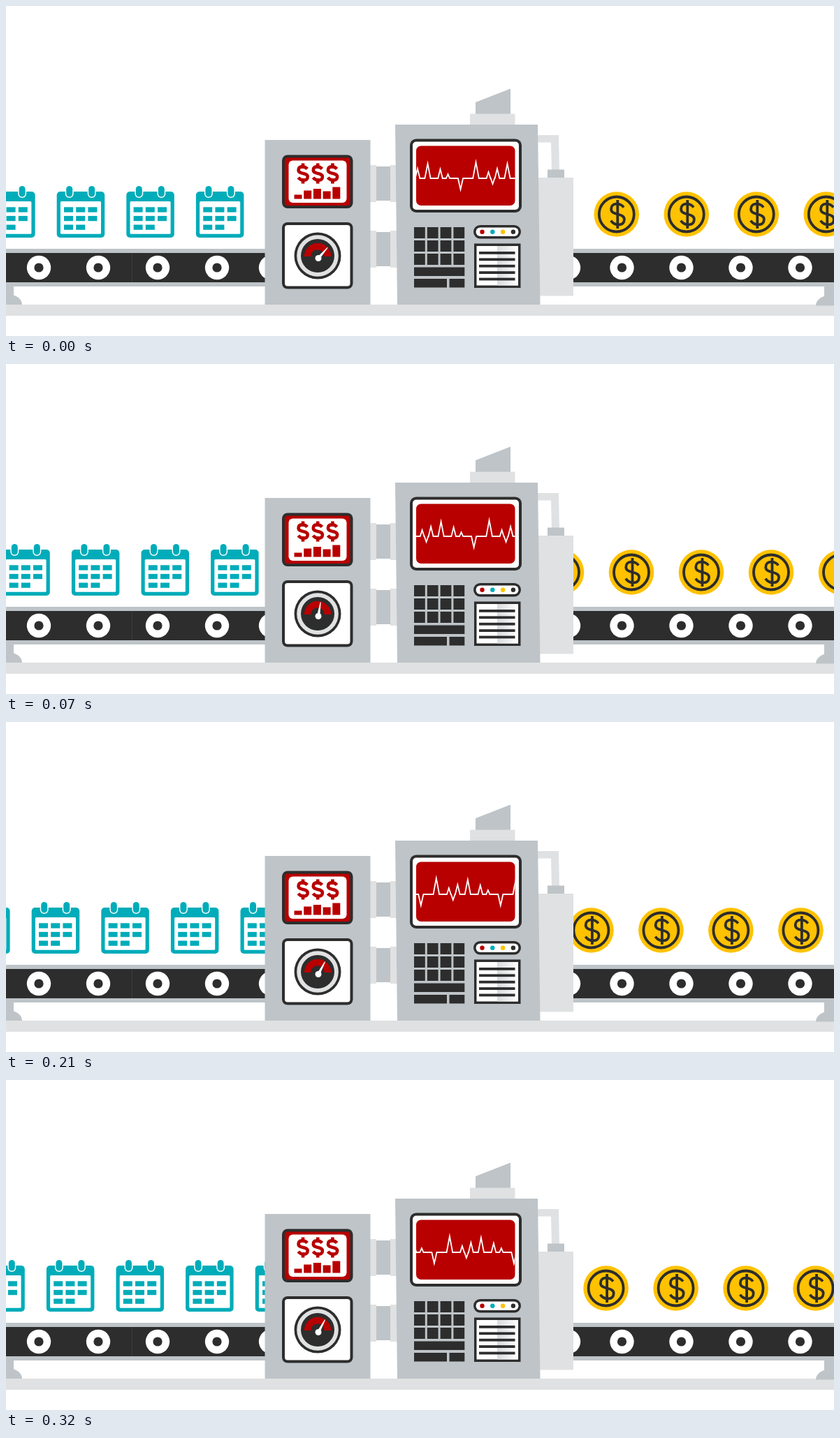
Write an HTML page with a canvas that moves like this. It is 1185 px wide and 473 px high and loops after 0.35 s.

```html
<!DOCTYPE html>
<html lang="en">
<head>
<meta charset="utf-8">
<title>Conveyor machine</title>
<style>
html, body { margin: 0; width: 100%; height: 100%; overflow: hidden; background: #fff; }
canvas { display: block; }
</style>
</head>
<body>
<canvas id="stage" width="1185" height="473"></canvas>
<script>
const ctx = document.getElementById('stage').getContext('2d');
const W = 1185, H = 473, STEP = 70, STEPS = 5;
const GRAY = '#bec4c8', LIGHT = '#e0e1e2', DARK = '#2d2d2d', WHITE = '#fff';
const RED = '#b80000', TEAL = '#00acb9', GOLD = '#ffc200';

// Boxes are given by their edges: left, top, right, bottom.
function rect(color, l, t, r, b) {
  ctx.fillStyle = color;
  ctx.fillRect(l, t, r - l, b - t);
}

function round(color, l, t, r, b, radius) {
  ctx.fillStyle = color;
  ctx.beginPath();
  ctx.roundRect(l, t, r - l, b - t, radius);
  ctx.fill();
}

function bezel(inner, l, t, r, b, radius, rim = 4) {
  round(DARK, l, t, r, b, radius);
  round(inner, l + rim, t + rim, r - rim, b - rim, Math.max(0, radius - rim));
}

function disc(color, x, y, r) {
  ctx.fillStyle = color;
  ctx.beginPath();
  ctx.arc(x, y, r, 0, Math.PI * 2);
  ctx.fill();
}

function arc(color, x, y, r, width, from = 0, to = Math.PI * 2) {
  ctx.strokeStyle = color;
  ctx.lineWidth = width;
  ctx.beginPath();
  ctx.arc(x, y, r, from, to);
  ctx.stroke();
}

function poly(color, ...points) {
  ctx.fillStyle = color;
  ctx.beginPath();
  points.forEach(p => ctx.lineTo(...p));
  ctx.fill();
}

function clipped(l, r, draw) {
  ctx.save();
  ctx.beginPath();
  ctx.rect(l, 0, r - l, H);
  ctx.clip();
  draw();
  ctx.restore();
}

// An S of size w by h with a vertical bar, either whole or just its two ends.
function dollar(color, x, y, w, h, width, whole) {
  const sx = w - width, sy = h - width, bar = h / 2 + h * 0.12;
  const gap = whole ? 0 : h / 2 - width;
  ctx.save();
  ctx.translate(x, y);
  ctx.strokeStyle = color;
  ctx.lineWidth = width;
  ctx.beginPath();
  ctx.moveTo(sx * 0.46, sy * -0.34);
  ctx.bezierCurveTo(sx * 0.2, sy * -0.56, sx * -0.48, sy * -0.6, sx * -0.48, sy * -0.25);
  ctx.bezierCurveTo(sx * -0.48, sy * 0.08, sx * 0.5, sy * -0.08, sx * 0.5, sy * 0.25);
  ctx.bezierCurveTo(sx * 0.5, sy * 0.6, sx * -0.2, sy * 0.58, sx * -0.5, sy * 0.31);
  ctx.stroke();
  for (const side of [-1, 1]) {
    ctx.beginPath();
    ctx.moveTo(0, side * gap);
    ctx.lineTo(0, side * bar);
    ctx.stroke();
  }
  ctx.restore();
}

function calendar(x) {
  round(TEAL, x, 266, x + 68.5, 332, 5);
  round(WHITE, x + 5.2, 280, x + 63.3, 326.8, 1.5);
  for (const ring of [18, 50]) {
    round(WHITE, x + ring - 6, 256.5, x + ring + 6, 275, 6);
    round(TEAL, x + ring - 4.5, 258, x + ring + 4.5, 273.5, 4.5);
  }
  for (let i = 0; i < 8; i++) {
    const l = x + 10.3 + (i % 3) * 17.2, t = 288.3 + Math.floor(i / 3) * 12.6;
    rect(TEAL, l, t, l + 13, t + 7.3);
  }
}

function coin(x) {
  disc(GOLD, x, 298.5, 32.3);
  arc(DARK, x, 298.5, 25, 3.8);
  dollar(DARK, x + 1.5, 298.5, 23, 33, 3.8, true);
}

function roller(x) {
  disc(WHITE, x, 375, 17.2);
  disc(DARK, x, 375, 6.6);
}

function belt(l, r, first) {
  rect(GRAY, l, 348, r, 402);
  rect(DARK, l, 354, r, 396);
  for (let i = 0; i < 4; i++) roller(first + i * 85);
}

function belts() {
  belt(0, 380, 47);
  roller(379);
  rect('#3c3c3c', 180, 354, 181, 396);
  belt(800, W, 881.5);
  roller(805);
}

function leg(l, r, x, y) {
  rect(GRAY, l, 400, r, 418);
  ctx.beginPath();
  ctx.ellipse(x, y, 20, 15, 0, Math.PI, Math.PI * 2);
  ctx.fill();
}

function body() {
  for (const y of [228, 322]) {
    rect(LIGHT, 521, y, 560, y + 53);
    rect(WHITE, 530, y, 550, y + 53);
    rect(GRAY, 530, y + 2, 550, y + 51);
  }
  rect(GRAY, 370.5, 192, 521.5, 428);
  poly(LIGHT, [760, 185], [791, 185], [792, 236], [781, 236], [780, 195.5], [760, 195.5]);
  rect(LIGHT, 760, 246, 812, 415.5);
  rect(GRAY, 775, 234.5, 799, 246);
  poly(GRAY, [672, 138], [722, 118.5], [722, 155], [672, 155]);
  rect(LIGHT, 664, 154.5, 728.5, 170);
  poly(GRAY, [557, 170], [761, 170], [764.5, 428], [560, 428]);
}

function chart() {
  bezel(RED, 395, 213.5, 496.5, 290, 8);
  round(WHITE, 404.5, 221.5, 487.5, 282, 6);
  for (let i = 0; i < 3; i++) dollar(RED, 425 + i * 21.2, 240, 18, 23.5, 4.6, false);
  [6, 12, 14.5, 11, 17].forEach((height, i) => {
    const l = 412.5 + i * 13.7;
    rect(RED, l, 276.5 - height, l + 11, 276.5);
  });
}

function gauge(degrees) {
  bezel(WHITE, 395, 310, 496.5, 405.5, 8);
  disc(DARK, 446, 358, 33.5);
  disc(LIGHT, 446, 358, 29.8);
  disc(DARK, 446, 358, 24);
  arc(RED, 446, 359, 14.5, 9.5, Math.PI, Math.PI * 2);
  ctx.save();
  ctx.translate(447, 361.5);
  ctx.rotate(degrees * Math.PI / 180);
  poly(WHITE, [-2.2, 0], [-0.5, -20.5], [0.5, -20.5], [2.2, 0]);
  ctx.restore();
  disc(WHITE, 447, 361.5, 4.5);
}

// One heartbeat: where each spike sits and how high it rises.
const PULSE = 114;
const SPIKES = [[0, -16], [22, 23], [40, 9], [46, -8], [52.5, 14], [67, 21], [85, 13], [96, 6]];

function monitor(shift) {
  bezel(WHITE, 578, 190.5, 738, 296, 9);
  round(RED, 587, 200.5, 728.5, 286, 7);
  clipped(587, 728.5, () => {
    ctx.beginPath();
    for (let x = 422.5 + shift; x < 860; x += PULSE) {
      for (const [dx, up] of SPIKES) {
        const half = 2 + Math.abs(up) / 10;
        ctx.lineTo(x + dx - half, 247);
        ctx.lineTo(x + dx, 247 - up);
        ctx.lineTo(x + dx + half, 247);
      }
    }
    ctx.strokeStyle = WHITE;
    ctx.lineWidth = 1.8;
    ctx.stroke();
  });
}

function keys() {
  for (let i = 0; i < 12; i++) {
    const l = 584 + (i % 4) * 18.8, t = 317 + Math.floor(i / 4) * 19;
    rect(DARK, l, t, l + 15.8, t + 16);
  }
  rect(DARK, 584, 374.5, 656.3, 387);
  rect(DARK, 584, 391, 631, 403.5);
  rect(DARK, 634.5, 391, 656.3, 403.5);
}

function lamps() {
  bezel(WHITE, 669, 314, 737, 333.5, 9.75, 3.5);
  [RED, TEAL, GOLD, DARK].forEach((c, i) => disc(c, 681.5 + i * 14.8, 323.7, 3.2));
}

function paper() {
  bezel(WHITE, 670, 340.5, 736.5, 404, 0, 3.5);
  const shade = ctx.createLinearGradient(703, 0, 733, 0);
  shade.addColorStop(0, '#d9dbdd');
  shade.addColorStop(1, WHITE);
  rect(shade, 703, 344, 733, 400.5);
  for (let i = 0; i < 5; i++) rect(DARK, 677, 352 + i * 9.4, 728.5, 355.8 + i * 9.4);
}

function frame(step) {
  const travel = step * 21.2;
  rect(WHITE, 0, 0, W, H);
  rect(LIGHT, 0, 428, W, 444);
  leg(0, 11, 3, 428);
  leg(1171, W, 1179, 429.5);
  belts();
  clipped(0, 450, () => {
    for (let i = -2; i < 4; i++) calendar(72.7 + i * 99.6 + travel);
  });
  clipped(790, W, () => {
    for (let i = -1; i < 4; i++) coin(873.8 + i * 100 + travel);
  });
  body();
  chart();
  gauge([41, 9, 9, 28, 28][step]);
  monitor(step * 19.1);
  keys();
  lamps();
  paper();
}

function play() {
  frame(Math.floor(performance.now() / STEP) % STEPS);
  requestAnimationFrame(play);
}
play();
</script>
</body>
</html>
```
